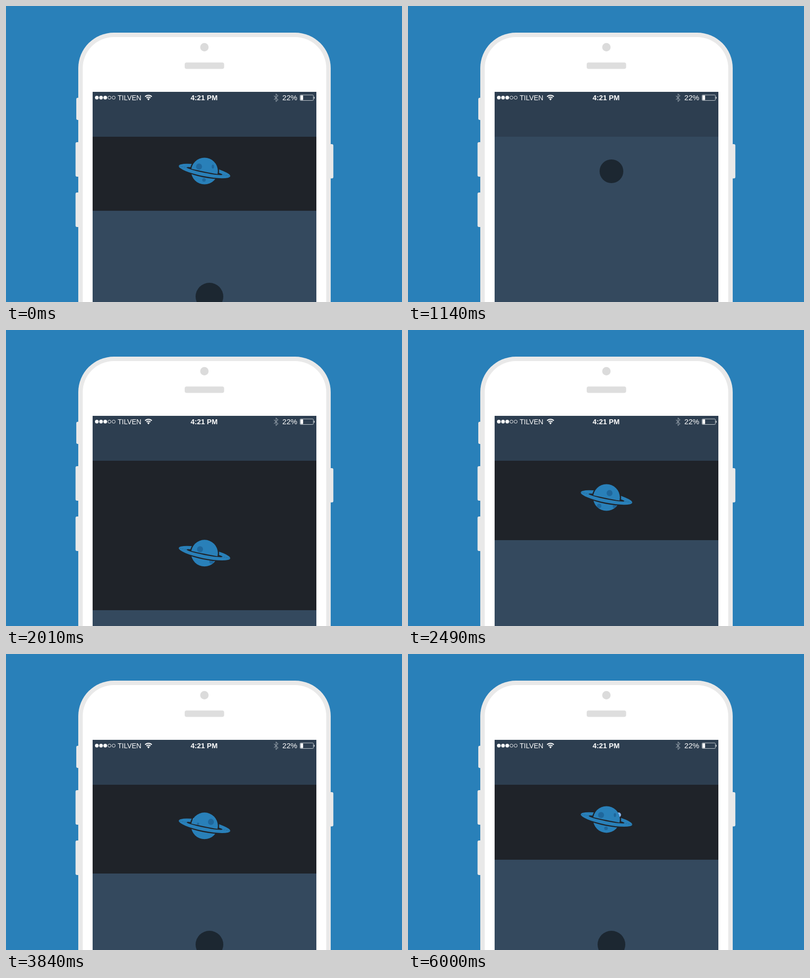
Recreate the animation shown at these times as an HTML page with a canvas. Size 800x600 px, loop 6.03 s.

```html
<!DOCTYPE html>
<html lang="en">
<head>
<meta charset="utf-8">
<title>Planet pull to refresh</title>
<style>
html, body { margin: 0; width: 100%; height: 100%; overflow: hidden; background: #2980b9; }
canvas { display: block; }
</style>
</head>
<body>
<canvas id="stage" width="800" height="600"></canvas>
<script>
const c = document.getElementById('stage').getContext('2d');
const LOOP = 6030, TAU = Math.PI * 2;
const BLUE = '#2980b9', CRATER = '#1f679c', PANEL = '#1f2329';
const TOP = 265, TILT = 0.2, STRIP = 125;

// surface craters: x along the strip, y, rx, ry
const craters = [
  [0, -4, 2.3, 2.5], [26, -8, 6, 6.2], [49, 17, 4.5, 4.5],
  [70, -9, 6, 6.2], [80, 18, 3.6, 3.6], [98, -9, 2.4, 4]
];

const clamp = u => Math.max(0, Math.min(1, u));
const span = (t, a, b) => clamp((t - a) / (b - a));
const mix = (a, b, u) => a + (b - a) * u;
const easeOut = (u, p) => 1 - (1 - u) ** p;
const easeInOut = u => u < 0.5 ? (2 * u) ** 2.5 / 2 : 1 - (2 - 2 * u) ** 2.5 / 2;

function rect(x, y, w, h, color, r = 0) {
  c.fillStyle = color;
  c.beginPath();
  c.roundRect(x, y, w, h, r);
  c.fill();
}
function oval(x, y, rx, ry, color) {
  c.fillStyle = color;
  c.beginPath();
  c.ellipse(x, y, rx, ry, 0, 0, TAU);
  c.fill();
}
const disc = (x, y, r, color) => oval(x, y, r, r, color);
function line(points, color, width) {
  c.strokeStyle = color;
  c.lineWidth = width;
  c.beginPath();
  points.forEach(([x, y]) => c.lineTo(x, y));
  c.stroke();
}
function label(text, x, y, font) {
  c.font = font + ' "Liberation Sans", Arial, sans-serif';
  c.fillStyle = '#fff';
  c.fillText(text, x, y);
}

// height of the opened panel
function panelHeight(t) {
  if (t < 240) return 152 * (1 - easeInOut(span(t, -30, 240)));
  if (t < 1140) return 0;
  if (t < 2370) return 322 * easeOut(span(t, 1140, 2370), 2.3);
  if (t < 3240) return 322 * (1 - easeInOut(span(t, 2370, 2610)));
  if (t < 3640) return 254 * easeInOut(span(t, 3240, 3640));
  return t < 6000 ? 152 + 102 * Math.exp((3640 - t) * 0.00647) : 152;
}

// how far the surface has turned
function spin(t) {
  if (t < 1000) return 81;
  if (t < 3000) return 35 + (t - 2010) * 0.06;
  if (t < 3840) return 13 - (3840 - t) * 0.1;
  if (t < 5160) return mix(13, 152, easeOut(span(t, 3840, 5130), 3));
  return mix(27, 81, easeInOut(span(t, 5160, 6030)));
}

// one lap starts and ends slowly behind the planet
function moonAngle(t) {
  const u = t < 4885 ? span(t, 3608, 4885) : span(t, 4885, 6250);
  return 1.6 + TAU * easeInOut(u);
}

function ring(front) {
  c.save();
  c.rotate(TILT);
  if (front) {
    c.beginPath();
    c.rect(-70, 0, 140, 40);
    c.clip();
    c.fillStyle = PANEL;
    c.beginPath();
    c.ellipse(0, 0, 53, 13, 0, 0, TAU);
    c.ellipse(0, 0, 37, 1.2, 0, 0, TAU);
    c.fill('evenodd');
  }
  c.fillStyle = BLUE;
  c.beginPath();
  c.ellipse(0, 0, 53, 10.5, 0, 0, TAU);
  c.ellipse(0, 0, 37, 3.6, 0, 0, TAU);
  c.fill('evenodd');
  c.restore();
}

function body(t) {
  c.save();
  c.beginPath();
  c.arc(0, 0, 27, 0, TAU);
  c.clip();
  c.fillStyle = BLUE;
  c.fillRect(-30, -30, 60, 60);
  const s = spin(t);
  for (const [x, y, rx, ry] of craters) {
    const pos = (((x - s + 62) % STRIP) + STRIP) % STRIP - 62;
    oval(pos, y, rx, ry, CRATER);
  }
  c.restore();
}

function planet(t, y) {
  c.save();
  c.translate(401, y);
  const a = moonAngle(t);
  const moon = () => disc(5 + 88 * Math.cos(a), 4.5 + 16.5 * Math.cos(a + 1.23), 4.7, '#86b6f0');
  const hasMoon = t >= 3840, behind = Math.sin(a) > 0;

  ring(false);
  c.save();
  c.rotate(TILT);
  c.beginPath();
  c.rect(-70, -60, 140, 62);
  c.clip();
  disc(0, 0, 29.5, PANEL);
  c.restore();
  if (hasMoon && behind) moon();
  body(t);
  ring(true);
  if (hasMoon && !behind) moon();
  c.restore();
}

function touch(y, r, alpha = 1) {
  c.globalAlpha = alpha;
  disc(411, y, r, '#1c2731');
  c.globalAlpha = 1;
}

function finger(t, h) {
  if (t < 690) {
    const u = span(t, 480, 690);
    touch(589, 28, 1 - u);
    touch(335, 28 - 4 * u, u);
  } else if (t < 2370) {
    touch(335 + h, 24);
  } else if (t < 3240) {
    const u = span(t, 2550, 2730);
    touch(335, 28 - 4 * u, u);
  } else if (t < 3640) {
    touch(335 + h, 24);
  } else {
    touch(589, 24 + 4 * span(t, 3640, 3760));
  }
}

function phone() {
  rect(0, 0, 800, 600, BLUE);
  rect(142, 186, 10, 45, '#e9e9e9', 3);
  rect(140.5, 276, 12, 70, '#e9e9e9', 3);
  rect(140.5, 378, 12, 70, '#e9e9e9', 3);
  rect(650, 280, 11.3, 69.5, '#e9e9e9', 3);
  rect(146, 54, 510, 700, '#e9e9e9', 72);
  rect(155, 63, 492, 700, '#fff', 63);
  disc(400.8, 83.5, 8.5, '#dbdbdb');
  rect(361, 114.5, 79.7, 13, '#dedede', 4);
  rect(175, 174, 452, 426, '#34495e');
}

function statusBar() {
  rect(175, 174, 452, 91, '#2d3e50');
  for (let i = 0; i < 5; i++) {
    const x = 183.5 + i * 8.5;
    if (i < 3) {
      disc(x, 185.8, 3.7, '#fff');
    } else {
      c.strokeStyle = '#fff';
      c.lineWidth = 0.9;
      c.beginPath();
      c.arc(x, 185.8, 3.2, 0, TAU);
      c.stroke();
    }
  }
  label('TILVEN', 225.5, 191.3, '14px');
  label('4:21 PM', 373, 191.3, 'bold 14.4px');
  label('22%', 558.3, 191.3, '15px');

  // wireless signal
  c.strokeStyle = '#fff';
  c.lineWidth = 2;
  for (const r of [5.8, 9.6]) {
    c.beginPath();
    c.arc(287.8, 190.6, r, -Math.PI * 0.75, -Math.PI * 0.25);
    c.stroke();
  }
  c.fillStyle = '#fff';
  c.beginPath();
  c.moveTo(287.8, 191.5);
  c.arc(287.8, 190.6, 3.4, -Math.PI * 0.75, -Math.PI * 0.25);
  c.fill();

  line([[541.5, 182], [549.5, 190], [545.5, 193.5], [545.5, 178.5], [549.5, 182], [541.5, 190]], '#8b97a2', 1.1);

  // battery
  c.strokeStyle = '#c3cad0';
  c.lineWidth = 1;
  c.beginPath();
  c.roundRect(594, 180.3, 27, 11.2, 1.5);
  c.stroke();
  rect(595, 181.2, 5.2, 9.4, '#fff', 0.5);
  rect(621.8, 184, 1.6, 4, '#d5dadf', 1);
}

function draw(t) {
  const h = panelHeight(t);
  phone();
  finger(t, h);
  if (h > 0) {
    c.save();
    c.beginPath();
    c.rect(175, TOP, 452, h);
    c.clip();
    rect(175, TOP, 452, h, PANEL);
    planet(t, TOP + (h < 180 ? h * 0.463 : 83.5 + (h - 180) * 0.845));
    c.restore();
  }
  statusBar();
}

let start;
function tick(now) {
  start ??= now;
  draw((now - start) % LOOP);
  requestAnimationFrame(tick);
}
requestAnimationFrame(tick);
</script>
</body>
</html>
```
